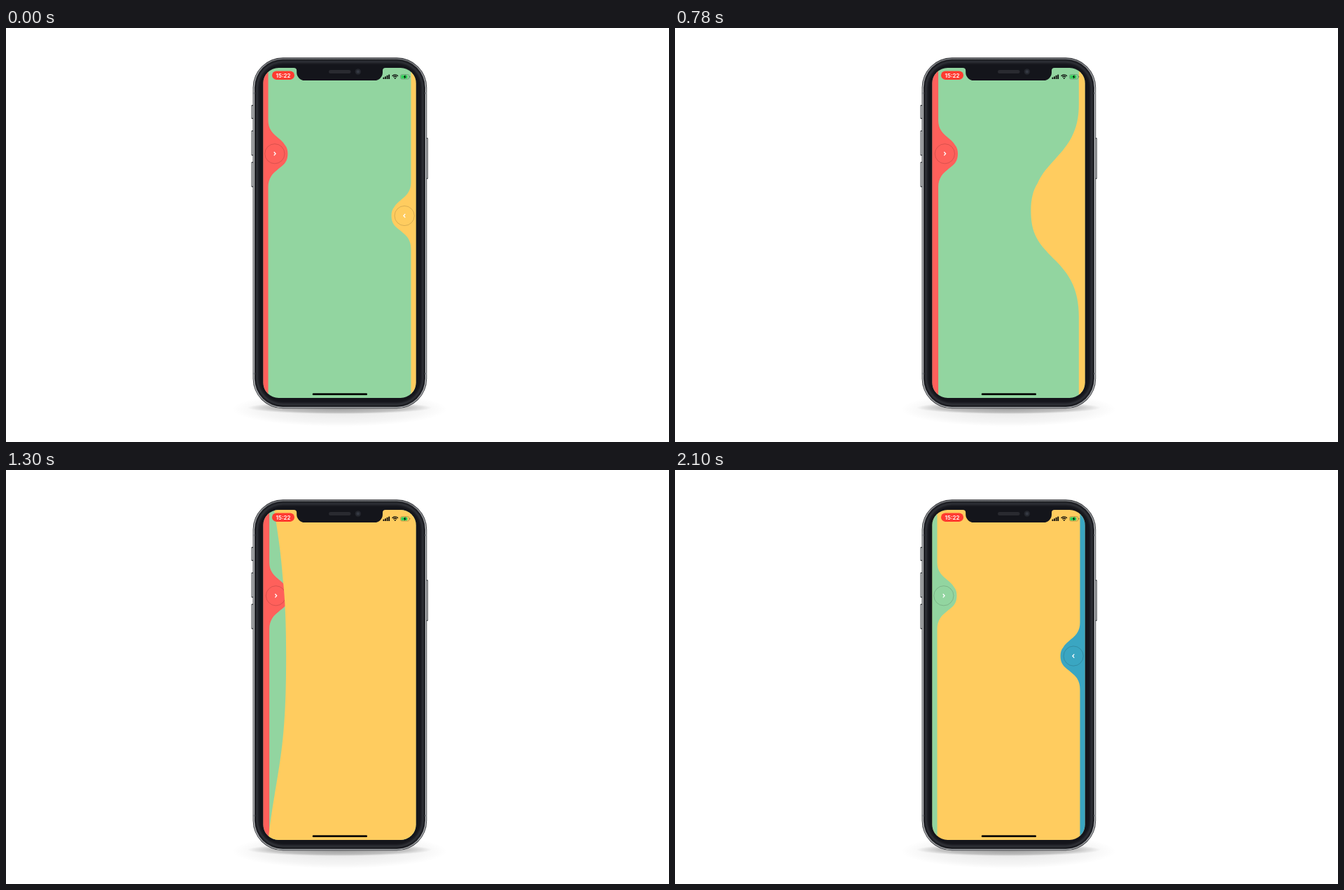
These frames come from a looping animation (947x592 px, 2560 ms). An HTML page with a canvas:

```html
<!DOCTYPE html>
<html lang="en">
<head>
<meta charset="utf-8">
<title>Liquid swipe</title>
<style>
html, body { margin: 0; width: 100%; height: 100%; overflow: hidden; background: #fff; }
canvas { display: block; width: 947px; height: 592px; }
</style>
</head>
<body>
<canvas id="stage"></canvas>
<script>
const W = 947, H = 592, LOOP = 2560;
const S = { x: 367.4, y: 57, w: 218.2, h: 472, r: 22 };
const U = S.w / 375; // one device point
const GREEN = '#92d5a0', RED = '#ff605b', YELLOW = '#ffcc5f', BLUE = '#3aa6c2';
const REST = { side: 15 * U, hr: 48 * U, vr: 82 * U };
const LEFT_Y = 179.8;

// Wave outline from its lower foot over the tip to its upper foot:
// each row is one cubic, as [across, along] fractions.
const CURVE = [
  [0, .1346, .0534, .2413, .1562, .3322],
  [.2362, .4031, .3305, .4561, .5012, .5351],
  [.5159, .5418, .5664, .565, .5749, .569],
  [.7284, .6397, .8087, .6833, .8774, .7399],
  [.9653, .8123, 1, .8936, 1, 1],
  [1, 1.1001, .9596, 1.1888, .8608, 1.2564],
  [.7852, 1.3331, .7034, 1.3796, .5291, 1.4665],
  [.5242, 1.469, .5057, 1.4782, .5015, 1.4803],
  [.3187, 1.5714, .2332, 1.6204, .1541, 1.6874],
  [.051, 1.7748, 0, 1.8709, 0, 2]
];

const canvas = document.getElementById('stage');
const ctx = canvas.getContext('2d');
const dpr = window.devicePixelRatio || 1;
canvas.width = W * dpr;
canvas.height = H * dpr;

const clamp = v => Math.max(0, Math.min(1, v));
const mix = (a, b, k) => a + (b - a) * k;
const ramp = (t, a, b) => clamp((t - a) / (b - a));
const smooth = k => k * k * (3 - 2 * k);

function box(x, y, w, h, r, color) {
  ctx.beginPath();
  ctx.roundRect(x, y, w, h, r);
  ctx.fillStyle = color;
  ctx.fill();
}

function disc(x, y, r, color) {
  ctx.beginPath();
  ctx.arc(x, y, r, 0, Math.PI * 2);
  ctx.fillStyle = color;
  ctx.fill();
}

function line(points, width, color) {
  ctx.beginPath();
  points.forEach(([x, y]) => ctx.lineTo(x, y));
  ctx.lineWidth = width;
  ctx.strokeStyle = color;
  ctx.stroke();
}

// dir 1 grows from the left edge, -1 from the right edge
function wave(dir, { side, hr, vr }, cy, color, alpha = 1) {
  const edge = dir > 0 ? S.x : S.x + S.w;
  const far = edge - dir * 80;
  const px = h => edge + dir * (side + hr * h);
  const py = v => cy + vr * (1 - v);
  ctx.beginPath();
  ctx.moveTo(far, cy + 900);
  ctx.lineTo(px(0), cy + 900);
  ctx.lineTo(px(0), py(0));
  for (const [a, b, c, d, e, f] of CURVE)
    ctx.bezierCurveTo(px(a), py(b), px(c), py(d), px(e), py(f));
  ctx.lineTo(px(0), cy - 900);
  ctx.lineTo(far, cy - 900);
  ctx.closePath();
  ctx.fillStyle = color;
  ctx.fill();

  if (alpha <= 0) return;
  const x = px(1) - dir * 18.6;
  ctx.globalAlpha = alpha;
  ctx.beginPath();
  ctx.arc(x, cy, 14.1, 0, Math.PI * 2);
  ctx.lineWidth = .6;
  ctx.strokeStyle = 'rgba(0,0,0,.26)';
  ctx.stroke();
  line([[x - dir * 1.1, cy - 2.6], [x + dir * 1.2, cy], [x - dir * 1.1, cy + 2.6]], 1.3, '#fff');
  ctx.globalAlpha = 1;
}

function swipe(p) {
  const grow = clamp(p / .4);
  let hr = mix(48, 300, grow);
  if (p >= 1) hr = 0;
  else if (p > .4) {
    const k = (p - .4) / .6, beta = 40 / 19.6, w0 = 50 / 9.8;
    hr = 300 * Math.exp(-beta * k) * Math.cos(Math.sqrt(w0 * w0 - beta * beta) * k);
  }
  return {
    side: mix(15, 375, ramp(p, .2, .8)) * U,
    hr: hr * U,
    vr: mix(82 * U, S.h * .9, grow)
  };
}

// Slow drag, then release at constant speed
function progress(t) {
  if (t < 540) return .035 * ramp(t, 400, 540);
  if (t < 930) return mix(.035, .158, ramp(t, 540, 930));
  return clamp(.158 + (t - 930) * .0019);
}

function dragY(t) {
  if (t < 540) return mix(268.5, 250, smooth(ramp(t, 380, 540)));
  return mix(250, 268, smooth(ramp(t, 540, 960))) - 2 * ramp(t, 1000, 1200);
}

// Damped spring that brings the side strips in
function spring(s) {
  const b = 4.46, w = 8.98;
  const dev = Math.exp(-b * s) * (Math.cos(w * s) + b / w * Math.sin(w * s));
  return { ...REST, side: REST.side - 37 * dev };
}

function screen(t) {
  ctx.save();
  ctx.beginPath();
  ctx.roundRect(S.x, S.y, S.w, S.h, S.r);
  ctx.clip();
  const next = t >= 1380;
  ctx.fillStyle = next ? YELLOW : GREEN;
  ctx.fillRect(S.x, S.y, S.w, S.h);
  if (next) {
    const strip = spring((Math.min(t, 2100) - 1380) / 1000);
    wave(1, strip, LEFT_Y, GREEN);
    wave(-1, strip, 266, BLUE);
  } else {
    const strip = spring(.72 + Math.max(0, t - 40) / 1000);
    const p = progress(t);
    wave(1, strip, LEFT_Y, RED);
    wave(-1, p > 0 ? swipe(p) : strip, dragY(t), YELLOW, 1 - p / .1);
  }
  status();
  box(437.7, 522.3, 78.3, 2.7, 1.35, '#050505');
  ctx.restore();
}

function status() {
  box(380, 61.5, 32, 12.4, 6.2, '#ff3b30');
  ctx.fillStyle = '#fff';
  ctx.font = '600 8px Inter, Roboto, sans-serif';
  ctx.textAlign = 'center';
  ctx.textBaseline = 'alphabetic';
  ctx.fillText('15:22', 396, 70.7);

  for (let i = 0; i < 4; i++) {
    const h = 2.4 + i * 1.4;
    box(538.5 + i * 2.6, 73 - h, 1.8, h, .5, '#0a0a0a');
  }

  ctx.strokeStyle = '#0a0a0a';
  ctx.lineWidth = 1.3;
  for (const r of [3.4, 5.7]) {
    ctx.beginPath();
    ctx.arc(555.8, 72.6, r, -Math.PI * .76, -Math.PI * .24);
    ctx.stroke();
  }
  ctx.beginPath();
  ctx.moveTo(555.8, 73);
  ctx.arc(555.8, 73, 2, -Math.PI * .76, -Math.PI * .24);
  ctx.fillStyle = '#0a0a0a';
  ctx.fill();

  ctx.beginPath();
  ctx.roundRect(563.6, 66.6, 12.2, 6.4, 1.9);
  ctx.lineWidth = .6;
  ctx.strokeStyle = 'rgba(0,0,0,.4)';
  ctx.stroke();
  box(564.4, 67.4, 9, 4.8, 1.2, '#30d158');
  box(576.4, 68.8, .8, 2, .4, 'rgba(0,0,0,.4)');
  ctx.beginPath();
  [[570.6, 66.8], [567.6, 70.2], [569.4, 70.2], [568.8, 72.8], [571.8, 69.4], [570, 69.4]]
    .forEach(([x, y]) => ctx.lineTo(x, y));
  ctx.fillStyle = '#0a0a0a';
  ctx.fill();
}

function shadow() {
  const layer = (cy, rx, ry, a, mid) => {
    ctx.save();
    ctx.translate(476.5, cy);
    ctx.scale(rx, ry);
    const g = ctx.createRadialGradient(0, 0, 0, 0, 0, 1);
    g.addColorStop(0, `rgba(0,0,0,${a})`);
    g.addColorStop(.75, `rgba(0,0,0,${a * mid})`);
    g.addColorStop(1, 'rgba(0,0,0,0)');
    ctx.fillStyle = g;
    ctx.fillRect(-1, -1, 2, 2);
    ctx.restore();
  };
  layer(545, 154, 25, .1, .4);
  layer(543, 132, 9, .32, .6);
}

function sideKey(x, y, h) {
  box(x, y, 4, h, 1, '#33363a');
  box(x + .8, y + 1.2, 2.4, h - 2.4, .5, '#d9dbdd');
}

// Polished rim: bright along the sides, dim across the top and bottom
function rim() {
  const g = ctx.createLinearGradient(0, 42, 0, 544);
  g.addColorStop(0, '#77797d');
  g.addColorStop(.1, '#d6d8da');
  g.addColorStop(.9, '#d6d8da');
  g.addColorStop(1, '#a4a6a9');
  return g;
}

function phone() {
  sideKey(350.5, 110, 20);
  sideKey(350.5, 146.5, 36);
  sideKey(350.5, 191.5, 36);
  sideKey(598.7, 157, 59);
  const rings = [
    [0, '#303236'], [.9, rim()], [2.2, '#3a3c41'],
    [3.1, '#17181d'], [4.5, '#2b2d33'], [7.5, '#1d1e24'], [9.5, '#14151b']
  ];
  for (const [d, color] of rings)
    box(352.6 + d, 42.3 + d, 248.6 - 2 * d, 502 - 2 * d, 43 - d, color);
  for (const x of [352.8, 598.5])
    for (const y of [92, 493]) box(x, y, 2.5, 2.5, 0, '#85888c');
}

function notch() {
  ctx.beginPath();
  ctx.moveTo(411, 56);
  ctx.lineTo(411, 57);
  ctx.quadraticCurveTo(415.2, 57, 415.2, 61);
  ctx.lineTo(415.2, 63);
  ctx.arcTo(415.2, 75, 428, 75, 11.5);
  ctx.arcTo(538, 75, 538, 63, 11.5);
  ctx.lineTo(538, 61);
  ctx.quadraticCurveTo(538, 57, 542, 57);
  ctx.lineTo(542, 56);
  ctx.closePath();
  ctx.fillStyle = '#14151b';
  ctx.fill();
  box(461, 60, 31.5, 5, 2.5, '#292a30');
  disc(502.8, 62.5, 4.2, '#25272e');
  disc(502.8, 62.5, 2.2, '#353943');
}

function frame(now) {
  const t = Math.floor((now % LOOP) / 20) * 20;
  ctx.setTransform(dpr, 0, 0, dpr, 0, 0);
  ctx.fillStyle = '#fff';
  ctx.fillRect(0, 0, W, H);
  shadow();
  phone();
  screen(t);
  notch();
}

const start = performance.now();
function tick() {
  frame(performance.now() - start);
  requestAnimationFrame(tick);
}
tick();
</script>
</body>
</html>
```
